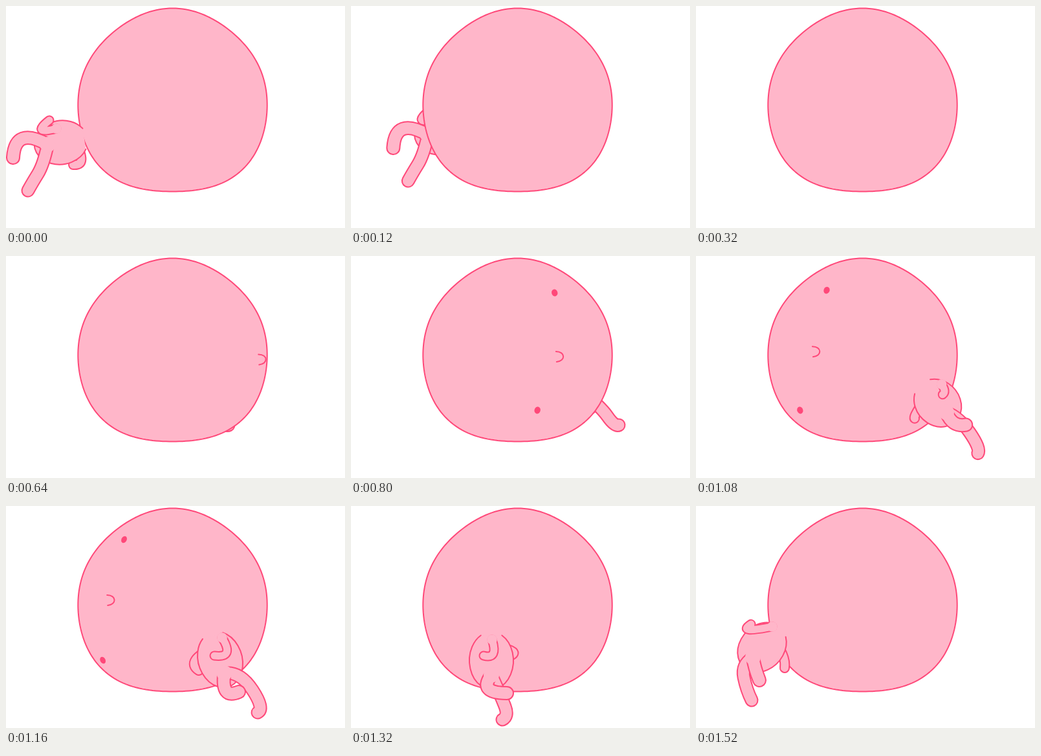
Recreate the animation shown at these times as an HTML page with a canvas. Size 524x344 px, loop 1.56 s.

```html
<!DOCTYPE html>
<html lang="en">
<head>
<meta charset="utf-8">
<title>Running around</title>
<style>
html, body { margin: 0; width: 100%; height: 100%; overflow: hidden; background: #fff; }
canvas { display: block; }
</style>
</head>
<body>
<canvas id="stage" width="524" height="344"></canvas>
<script>
const ctx = document.getElementById('stage').getContext('2d');
const PINK = '#ffb6c9', LINE = '#ff4879';
const STEP = 40, STEPS = 39;
const { PI, sin, cos } = Math;

const mix = (a, b, k) => a + (b - a) * k;
const mixPoint = (p, q, k) => p.map((v, i) => mix(v, q[i], k));

function ink(color, width) {
  ctx.strokeStyle = color;
  ctx.lineWidth = width;
  ctx.stroke();
}

function paint(color) {
  ctx.fillStyle = color;
  ctx.fill();
}

// A flattened circle with heavy lower cheeks
function traceBall() {
  ctx.beginPath();
  for (let a = 0; a < 2 * PI; a += PI / 90) {
    const r = 1 + 0.032 * sin(a) + 0.022 * sin(3 * a) - 0.01 * sin(5 * a) + 0.0075 * (1 - cos(4 * a));
    ctx.lineTo(257.5 + 146 * r * cos(a), 145.5 + 142 * r * sin(a));
  }
  ctx.closePath();
}

function drawBall() {
  traceBall();
  paint(PINK);
  ink(LINE, 2);
}

function drawEye(x, y, turn, lean) {
  ctx.beginPath();
  ctx.ellipse(x, y, 1.5 + 3.5 * sin(turn), 5.5, lean * cos(turn), 0, 2 * PI);
  paint(LINE);
}

// The features slide over the ball as it turns
function drawFace(t) {
  const u = (t - 800) / 360;
  const turn = (64.7 + 87 * u - 20 * u * u) * PI / 180;
  const x = 265 + 147 * cos(turn), y = 156 - 10 * u;
  ctx.save();
  traceBall();
  ctx.clip();
  drawEye(263 + 121 * cos(turn), 57 - 5 * u, turn, -0.7);
  drawEye(317 + 172 * cos(turn + 0.61), 239, turn, 0.7);
  ctx.beginPath();
  ctx.moveTo(x - 11, y - 8);
  ctx.bezierCurveTo(x + 4, y - 8, x + 4, y + 7, x - 10, y + 8);
  ink(LINE, 2);
  ctx.restore();
}

// Joints of each limb run outwards; legs and the far arm are rooted on the spine
const leaving = {
  spine: [[126, 205], [44, 218]],
  farArm: [[128, 248], [104, 246]],
  longLeg: [[58, 246], [40, 275], [34, 286]],
  shortLeg: [[14, 186], [11, 235]],
  nearArm: [[78, 190], [38, 200], [67, 177]]
};
const peeking = {
  spine: [[320, 170], [370, 225]],
  farArm: [[365, 222], [372, 237]],
  longLeg: [[385, 232], [408, 265], [414, 262]],
  shortLeg: [[362, 225], [364, 230]],
  nearArm: [[340, 190], [344, 196], [350, 200]]
};
const outside = {
  spine: [[390, 203], [485, 222]],
  farArm: [[424, 262], [398, 247]],
  longLeg: [[474, 240], [500, 275], [506, 284]],
  shortLeg: [[492, 214], [503, 222]],
  nearArm: [[448, 191], [438, 172], [470, 189]]
};
const front = {
  spine: [[318, 196], [344, 280]],
  farArm: [[275, 240], [298, 255]],
  longLeg: [[362, 256], [400, 314], [389, 320]],
  shortLeg: [[332, 300], [360, 288]],
  nearArm: [[334, 204], [354, 236], [322, 232]]
};
const below = {
  spine: [[217, 195], [217, 284]],
  farArm: [[264, 224], [247, 232]],
  longLeg: [[232, 295], [244, 326], [234, 331]],
  shortLeg: [[196, 290], [241, 290]],
  nearArm: [[218, 207], [228, 238], [205, 232]]
};
const leftSide = {
  spine: [[130, 188], [74, 250]],
  farArm: [[140, 230], [137, 251]],
  longLeg: [[70, 246], [78, 285], [86, 301]],
  shortLeg: [[90, 250], [98, 270]],
  nearArm: [[118, 187], [62, 198], [85, 183]]
};

function mapPose(pose, change) {
  return Object.fromEntries(Object.entries(pose).map(([part, joints]) =>
    [part, joints.map((p, i) => change(p, part, i))]));
}

const shift = (pose, dx, dy) => mapPose(pose, ([x, y]) => [x + dx, y + dy]);

const keys = [
  [0, leaving], [320, shift(leaving, 145, -40)],
  [640, shift(peeking, -70, 0)], [800, peeking], [960, outside],
  [1160, front], [1320, below], [1520, leftSide], [1560, leaving]
];

function poseAt(t) {
  const next = keys.findIndex(key => key[0] > t);
  const [[t0, a], [t1, b]] = [keys[next - 1], keys[next]];
  const k = (t - t0) / (t1 - t0);
  return mapPose(a, (p, part, i) => mixPoint(p, b[part][i], k));
}

function drawLimb(joints, width) {
  const last = joints.length - 1;
  ctx.beginPath();
  ctx.moveTo(...joints[0]);
  for (let i = 1; i < last; i++) {
    const end = i === last - 1 ? joints[last] : mixPoint(joints[i], joints[i + 1], 0.5);
    ctx.quadraticCurveTo(...joints[i], ...end);
  }
  ink(LINE, width + 2);
  ink(PINK, width - 2);
  // open the root towards the body
  ctx.beginPath();
  ctx.arc(...joints[0], width * 0.6, 0, 2 * PI);
  paint(PINK);
}

function drawTorso([neck, hip]) {
  const [dx, dy] = [hip[0] - neck[0], hip[1] - neck[1]];
  const gap = 0.5;
  ctx.beginPath();
  ctx.ellipse(...mixPoint(neck, hip, 0.5), Math.hypot(dx, dy) / 2, 34, Math.atan2(dy, dx), gap - PI, PI - gap);
  paint(PINK);
  ink(LINE, 2);
}

function drawBody({ spine, farArm, longLeg, shortLeg, nearArm }) {
  const shoulder = mixPoint(...spine, 0.25), pelvis = mixPoint(...spine, 0.75);
  drawLimb([shoulder, ...farArm], 14);
  drawTorso(spine);
  drawLimb([pelvis, ...longLeg], 19);
  drawLimb([pelvis, ...shortLeg], 20);
  drawLimb(nearArm, 13);
}

function draw(t) {
  const behind = t > 0 && t < 960, away = t >= 320 && t < 640;
  ctx.fillStyle = '#fff';
  ctx.fillRect(0, 0, 524, 344);
  if (behind && !away) drawBody(poseAt(t));
  drawBall();
  if (t >= 640 && t <= 1200) drawFace(t);
  if (!behind) drawBody(poseAt(t));
}

ctx.lineJoin = ctx.lineCap = 'round';
const start = performance.now();
function tick() {
  const elapsed = performance.now() - start;
  draw(Math.floor(elapsed / STEP) % STEPS * STEP);
  requestAnimationFrame(tick);
}
tick();
</script>
</body>
</html>
```
